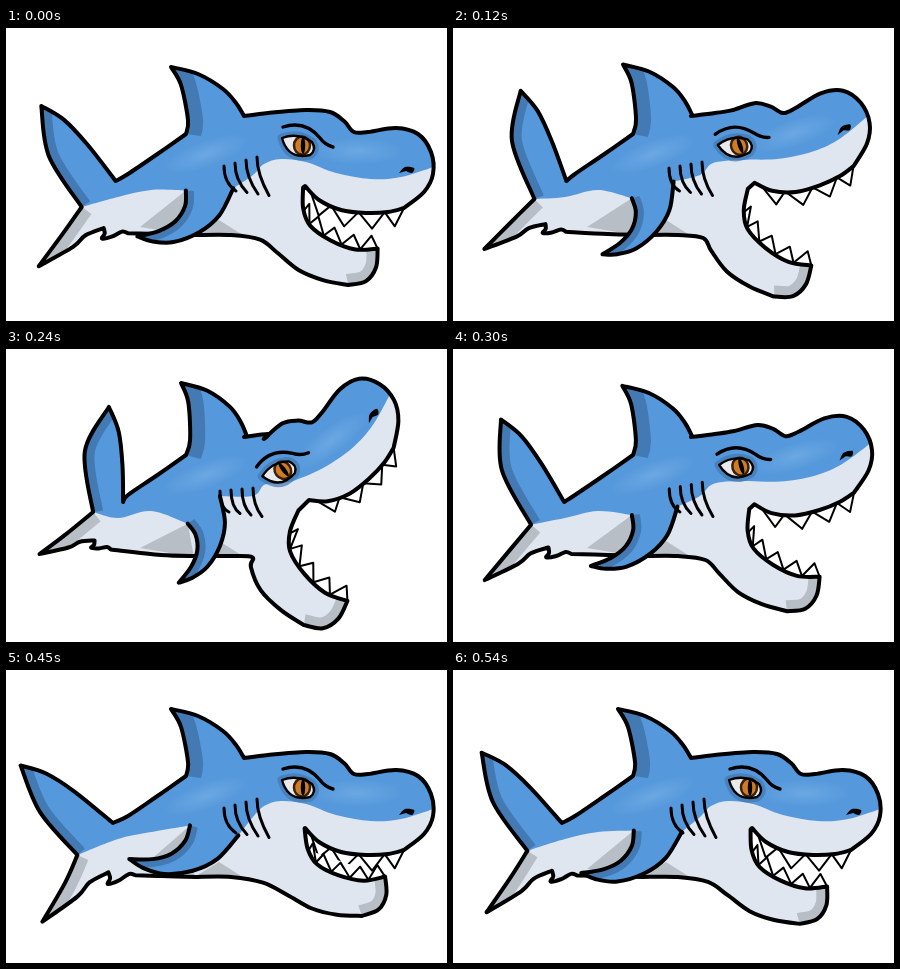
These frames come from a looping animation (441x293 px, 0.57 s). An HTML page:

```html
<!DOCTYPE html>
<html lang="en">
<head>
<meta charset="utf-8">
<title>Snapping shark</title>
<style>
html, body { margin: 0; width: 100%; height: 100%; overflow: hidden; background: #fff; }
svg { display: block; width: 100vw; height: 100vh; }
</style>
</head>
<body>
<svg id="stage" viewBox="0 0 441 293" fill="none" stroke-linejoin="round">
  <defs>
    <clipPath id="inBody"><path id="bodyMask"/></clipPath>
    <clipPath id="inFin"><path id="finMask"/></clipPath>
    <radialGradient id="glow">
      <stop offset="0" stop-color="#7ab2e8" stop-opacity=".6"/>
      <stop offset="1" stop-color="#7ab2e8" stop-opacity="0"/>
    </radialGradient>
  </defs>
</svg>
<script>
const NS = 'http://www.w3.org/2000/svg';
const stage = document.getElementById('stage');
const BLUE = '#5598db', DEEP = '#437ab3', PALE = '#dfe6f0', GREY = '#b8bec6', INK = '#000';
const HINGE = [292, 148], TAIL = [92, 165], SHOULDER = [234, 167];

let swim = 0; // jaw, tail and side fin: 0 shut to 3 wide
let lift = 0; // head: 0 level to 1 raised

const ramp = (x, a, b) => {
  const t = Math.min(1, Math.max(0, (x - a) / (b - a)));
  return t * t * (3 - 2 * t);
};

function turn([x, y], [cx, cy], deg, size = 1) {
  const a = deg * Math.PI / 180, c = Math.cos(a) * size, s = Math.sin(a) * size;
  return [cx + (x - cx) * c - (y - cy) * s, cy + (x - cx) * s + (y - cy) * c];
}

// A rule moves points drawn in the shut pose to the current pose.
const rule = move => (...n) => {
  const out = [];
  for (let i = 0; i < n.length; i += 2) out.push(move(n[i], n[i + 1]));
  return out;
};
const still = rule((x, y) => [x, y]);
const head = rule((x, y) => {
  const w = ramp(x, 262, 298);
  const bend = 0.13 * lift * w * Math.max(0, x - HINGE[0]);
  return turn([x, y - bend], HINGE, -37 * lift * w);
});
const jaw = rule((x, y) => {
  const w = ramp(x, 235, 300);
  return turn([x, y], HINGE, 11.1 * swim * w, 1 + 0.035 * swim * w);
});
const upperTail = rule((x, y) => {
  const [a, b] = turn([x, y], TAIL, 18.5 * swim);
  return [a + 2 * swim, b - swim];
});
const lowerTail = rule((x, y) => turn([x, y], TAIL, 8.3 * swim, 1 - 0.11 * swim));
const root = rule((x, y) => [x + 5.7 * swim, y - 8 * swim]);
const notch = rule((x, y) => [x + 3.7 * swim, y]);
const dorsal = rule((x, y) => {
  const k = lift * (106 - y) / 67;
  return [x + 10 * k, y - 5 * k];
});
const sideFin = rule((x, y) => {
  const [a, b] = turn([x, y], SHOULDER, -19 * swim, 1 - 0.05 * swim);
  return [a - 6.7 * swim, b - 6.7 * swim];
});

const LIP = [398,180, 382,184, 360,185, 335,182, 313,172, 299,158];
const GUM = [299,158, 303,178, 313,193, 335,203, 360,207, 381,202];

const curves = {
  tailFront: () => [...upperTail(9,102, 35,108, 65,124), ...notch(106,153)],
  back: () => [...notch(106,153), ...still(122,146, 150,127, 180,106)],
  finRear: () => dorsal(180,106, 182,92, 175,57, 165,39),
  finFront: () => dorsal(165,39, 192,46, 217,61, 230,75, 238,88),
  skull: () => head(238,88, 262,85, 300,82, 324,84, 338,93, 348,104, 362,104,
    390,100, 412,106, 425,124, 427,146, 418,164, 398,180),
  lip: () => head(...LIP),
  gum: () => jaw(...GUM),
  chin: () => jaw(381,202, 383,220, 376,235, 360,242),
  throat: () => jaw(360,242, 335,242, 310,237, 285,225, 258,213, 225,207, 190,207),
  belly: () => [...still(190,207, 155,206), ...lowerTail(132,205)],
  lowerLobe: () => lowerTail(132,205, 125,204, 115,211, 104,215, 106,209, 104,203),
  lobeLow: () => lowerTail(104,203, 85,214, 73,229, 38,256),
  lobeBack: () => [...lowerTail(38,256, 60,215), ...root(70,187)],
  tailBack: () => [...root(70,187), ...upperTail(32,147, 9,102)],
  finIn: () => sideFin(186,153, 180,168, 165,180, 145,184, 122,182),
  finOut: () => sideFin(122,182, 135,192, 156,200, 185,199, 211,189, 234,167),
  flank: () => [...root(70,187), ...still(112,169, 145,162), ...sideFin(186,153)],
  cheek: () => [...sideFin(...SHOULDER),
    ...head(247,147, 258,136, 275,131, 300,134, 330,145, 365,151, 395,149, 430,138)],
  nostril: () => head(393,145, 399,139, 408,140, 406,145, 400,143)
};

const num = n => n.toFixed(2);

function spline(p, start) {
  const pt = i => p[Math.max(0, Math.min(p.length - 1, i))];
  let d = start + p[0].map(num).join(' ');
  for (let i = 0; i < p.length - 1; i++) {
    const a = [0, 1].map(k => pt(i)[k] + (pt(i + 1)[k] - pt(i - 1)[k]) / 6);
    const b = [0, 1].map(k => pt(i + 1)[k] - (pt(i + 2)[k] - pt(i)[k]) / 6);
    d += 'C' + [...a, ...b, ...pt(i + 1)].map(num).join(' ');
  }
  return d;
}

const curve = (...names) => names.map((n, i) => spline(curves[n](), i ? 'L' : 'M')).join('');
const outline = () => curve('tailFront', 'back', 'finRear', 'finFront', 'skull', 'lip', 'gum',
  'chin', 'throat', 'belly', 'lowerLobe', 'lobeLow', 'lobeBack', 'tailBack') + 'Z';
const finShape = () => curve('finIn', 'finOut') + 'L205 140Z';

function underside() {
  const start = curves.flank()[0][1], end = curves.cheek().pop()[1];
  return curve('flank', 'cheek') + `L441 ${end}V293H0V${start}Z`;
}

// Point at share t of a flat list of coordinates
function along(p, t) {
  const v = t * (p.length / 2 - 1), i = Math.min(Math.floor(v), p.length / 2 - 2);
  return [0, 1].map(k => p[2 * i + k] + (p[2 * i + 2 + k] - p[2 * i + k]) * (v - i));
}

function teeth(edge, move, count, from, to, size) {
  const row = [], step = (to - from) / count;
  for (let i = 0; i <= count; i++) {
    row.push(...along(edge, from + i * step));
    if (i < count) {
      const [x, y] = along(edge, from + (i + 0.5) * step);
      row.push(x, y + size);
    }
  }
  return 'M' + move(...row).map(p => p.map(num).join(' ')).join('L');
}

function gill(i) {
  const x = 218 + 11 * i - 4 * lift, y = 138 - 3 * i + (4 + 2 * i) * lift;
  return `M${x} ${y}Q${x} ${y + 17} ${x + 12 - 3 * lift} ${163 + 1.5 * i}`;
}

const updates = [];

function make(tag, attrs, parent = stage) {
  const el = document.createElementNS(NS, tag);
  for (const k in attrs) el.setAttribute(k, attrs[k]);
  return parent.appendChild(el);
}

const follow = (el, shape) => updates.push(() => el.setAttribute('d', shape()));
const path = (shape, attrs, parent) => follow(make('path', attrs, parent), shape);
const ink = (shape, width) =>
  path(shape, { stroke: INK, 'stroke-width': width, 'stroke-linecap': 'round' });
const shade = (name, color, width, parent) =>
  path(() => curve(name), { stroke: color, 'stroke-width': width }, parent);

function headGroup(parent) {
  const g = make('g', {}, parent);
  updates.push(() => g.setAttribute('transform', `rotate(${-37 * lift} ${HINGE})`));
  return g;
}

follow(document.getElementById('bodyMask'), outline);
follow(document.getElementById('finMask'), finShape);

const enamel = { fill: '#fff', stroke: INK, 'stroke-width': 2 };
path(() => teeth(LIP, head, 4, 0, 0.92, 16 - 3 * lift), enamel);
path(() => teeth(GUM, jaw, 5, 0.22, 1, -13), enamel);

path(outline, { fill: BLUE });
const skin = make('g', { 'clip-path': 'url(#inBody)' });
path(underside, { fill: PALE }, skin);
shade('finRear', DEEP, 30, skin);
shade('tailBack', DEEP, 20, skin);
shade('lobeBack', GREY, 24, skin);
shade('chin', GREY, 22, skin);
path(() => `M${curves.finIn()[0]}L134 199L188 208Z`, { fill: GREY }, skin);
make('path', { d: 'M185 209L213 192L243 211Z', fill: GREY }, skin);
const shine = { rx: 46, ry: 14, fill: 'url(#glow)' };
make('ellipse', { ...shine, cx: 200, cy: 126, transform: 'rotate(-20 200 126)' }, skin);
make('ellipse', { ...shine, cx: 352, cy: 123 }, headGroup(skin));
ink(outline, 4);

path(finShape, { fill: BLUE });
shade('finIn', DEEP, 16, make('g', { 'clip-path': 'url(#inFin)' }));
ink(() => curve('finIn', 'finOut'), 4);
for (let i = 0; i < 4; i++) ink(() => gill(i), 3);
path(() => curve('nostril') + 'Z', { fill: INK });

const face = headGroup();
const lid = 'M276 110Q292 104 306 114Q311 122 304 127Q282 132 276 110Z';
make('path', { d: lid, stroke: DEEP, 'stroke-width': 9, opacity: 0.7 }, face);
make('path', { d: lid, fill: '#e8eaee' }, face);
make('ellipse', { cx: 296, cy: 117.5, rx: 8, ry: 9, fill: '#d07c26', stroke: '#3a2008', 'stroke-width': 2.5 }, face);
make('ellipse', { cx: 297, cy: 117.5, rx: 2.2, ry: 8, fill: INK }, face);
make('path', { d: lid, stroke: INK, 'stroke-width': 2.4 }, face);
make('path', { d: 'M277 99Q299 92 314 110Q319 117 327 119', stroke: INK, 'stroke-width': 3.4, 'stroke-linecap': 'round' }, face);

const STEP = 30, STEPS = 19, WIDE = 8, SHUT = 12;

// Slow opening, quick bite
function draw(ms) {
  const n = Math.floor(ms / STEP) % STEPS;
  const bite = (SHUT - n) / (SHUT - WIDE);
  if (n <= WIDE) {
    swim = 1 + 2 * n / WIDE;
    lift = n / WIDE;
  } else if (n <= SHUT) {
    swim = 3 * bite ** 1.09;
    lift = bite ** 1.2;
  } else {
    swim = ((n - SHUT) / (STEPS - SHUT)) ** 1.68;
    lift = 0;
  }
  updates.forEach(f => f());
}

const begin = performance.now();
function tick() {
  draw(performance.now() - begin);
  requestAnimationFrame(tick);
}
tick();
</script>
</body>
</html>
```
